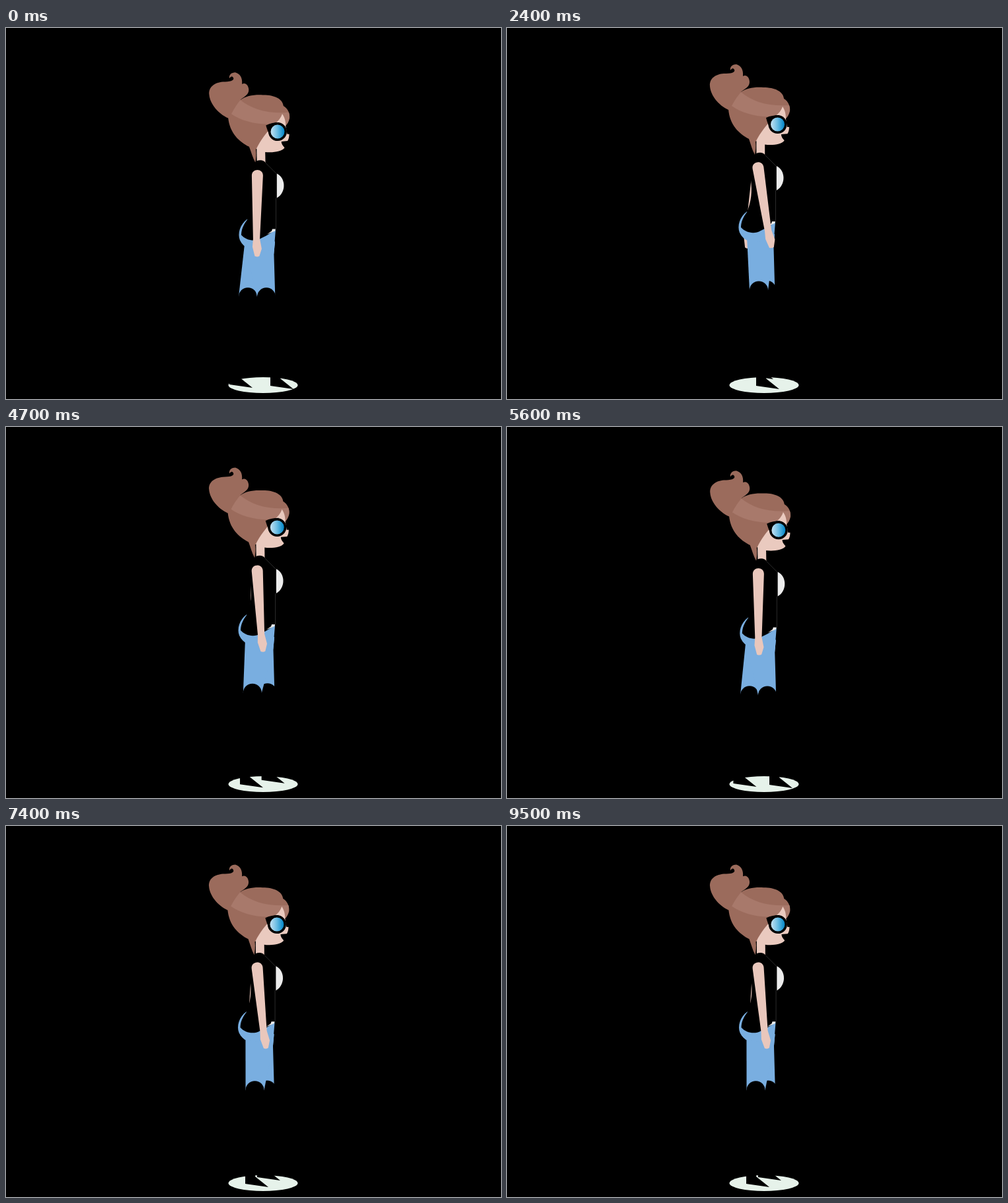
Recreate the animation shown at these times as an HTML page with a canvas. Size 749 by 562 pixels, loop 9600 ms.

```html
<!DOCTYPE html>
<html lang="en">
<head>
<meta charset="utf-8">
<title>Walk cycle</title>
<style>
html, body { margin: 0; width: 100%; height: 100%; overflow: hidden; background: #000; }
canvas { display: block; }
</style>
</head>
<body>
<canvas id="stage" width="749" height="562"></canvas>
<script>
const ctx = document.getElementById('stage').getContext('2d');
const LOOP = 9600, TICK = 100, STEP_FRAMES = 21;

const color = {
  hair: '#9b6b5c', band: '#a8796b', skin: '#eacabf', arm: '#e9c7bc',
  jeans: '#79aee0', shirt: '#ececec', floor: '#e6f2ea', black: '#000', seam: '#484848'
};

// Key poses over one step; the near foot is planted, the far foot swings.
const keyTimes = [0, .048, .143, .286, .476, .524, .667, .81, 1];
const keys = {
  drop:     [11.5, 10.6, 8.7, 3.7, 0, -.8, 3.2, 7.6, 11.5],
  swing:    [0, .015, .045, .125, .172, .16, .113, .056, 0],
  nearKnee: [394, 394, 391, 386.5, 381, 380, 376.5, 371, 366],
  farKnee:  [366, 367, 376, 386, 393, 393, 395, 396, 394],
  nearToeX: [435, 432, 427.5, 421, 412, 409, 397, 385, 373],
  nearToeY: [547, 547, 547, 547, 547, 547, 547, 546, 545],
  farToeX:  [373, 377.5, 383, 392, 403, 405, 415, 425, 435],
  farToeY:  [545, 545, 541, 536, 532, 531, 537, 541, 547]
};

function poseAt(u) {
  let i = 0;
  while (i < keyTimes.length - 2 && u >= keyTimes[i + 1]) i++;
  const f = (u - keyTimes[i]) / (keyTimes[i + 1] - keyTimes[i]);
  const pose = {};
  for (const name in keys) pose[name] = keys[name][i] + (keys[name][i + 1] - keys[name][i]) * f;
  return pose;
}

const shape = {
  bun: new Path2D('M307 88C306 76 316 70 328 69C338 69 346 68 344 63C342 60 340 61 338 64C337 58 342 55 347 55C354 57 358 63 357 73C362 70 367 75 367 82C367 90 358 93 354 97L345 126L335 124C320 117 308 102 307 88Z'),
  head: new Path2D('M354 97C362 91 375 89 388 90C405 90 418 96 419 107C426 111 429 120 428 126C427 131 424 135 422 137L412 150L380 170L376 172C377 180 376 186 375 192C371 185 369 176 366 168C351 160 337 147 335 123L342 110Z'),
  band: new Path2D('M354 97C372 112 395 119 427 117C429 123 427 132 422 137L417 119C414 126 410 131 405 134C380 136 355 129 340 118C344 110 349 103 354 97Z'),
  face: new Path2D('M417 119C421 125 422 131 422 138L424 150L427 150C427 154 426 158 424 161L420 170C416 177 400 178 390 176.5L377 171C383 159 393 146 405 134C411 130 415 125 417 119Z'),
  neck: new Path2D('M377.4 169H390.2V195H377.4Z'),
  mouth: new Path2D('M415 161C415 166 418 168 421 172L430 168L427 160Z'),
  temple: new Path2D('M392 136C398 133 405 132 412 132L402 156C396 151 394 143 392 136Z'),
  torso: new Path2D('M377 190C382 188 388 188 391 193L408 209V245L406 294C397 300 391 304 384 307C374 313 361 310 354 302C354 294 357 287 363 279C370 262 371 248 369 230C368 212 370 198 377 190Z'),
  hips: new Path2D('M363 278C352 286 348 300 352 310C355 316 359 320 364 322L403.4 326L406 294L380 285Z'),
  chest: new Path2D('M407.8 209C422 216 422 238 407.8 246Z'),
  hem: new Path2D('M393 301L400 296L401 293H406L405 296Z'),
  seam: new Path2D('M391 193L407 209M406.5 246V293'),
  arm: new Path2D('M-8.5 0C-8.5 -11.5 8.5 -11.5 8.5 0L3.7 96L6.5 111L3 122Q0 124 -4 122L-7.5 108L-6.5 96Z')
};

function fill(path, paint) {
  ctx.fillStyle = paint;
  ctx.fill(path);
}

function disc(x, y, rx, paint, ry = rx) {
  ctx.fillStyle = paint;
  ctx.beginPath();
  ctx.ellipse(x, y, rx, ry, 0, 0, Math.PI * 2);
  ctx.fill();
}

function polygon(paint, ...points) {
  ctx.fillStyle = paint;
  ctx.beginPath();
  points.forEach(([x, y]) => ctx.lineTo(x, y));
  ctx.fill();
}

function foot(x, y) {
  polygon(color.black, [x - 35, 520], [x - 35, y - 5], [x, y], [x - 20, y - 16], [x - 20, 520]);
}

function leg(knee, kneeY, dx, dy) {
  const edge = 405.3 + dx;
  polygon(color.jeans, [363 - dx, 316 + dy], [knee - 14, kneeY],
    [Math.min(knee + 14, edge), kneeY], [403.4 + dx, 330 + dy], [405 + dx, 312 + dy]);
  disc(knee, kneeY, 14, color.black);
}

function arm(x, y, angle) {
  ctx.save();
  ctx.translate(x, y);
  ctx.rotate(-angle);
  fill(shape.arm, color.arm);
  ctx.restore();
}

function head(tilt) {
  ctx.save();
  ctx.translate(385, 175);
  ctx.rotate(tilt);
  ctx.translate(-385, -175);
  fill(shape.neck, color.skin);
  fill(shape.bun, color.hair);
  fill(shape.head, color.hair);
  fill(shape.band, color.band);
  fill(shape.face, color.skin);
  fill(shape.mouth, color.black);
  fill(shape.temple, color.black);
  disc(409.5, 146, 14, color.black);
  const lens = ctx.createLinearGradient(399, 0, 420, 0);
  lens.addColorStop(0, '#c6e2f2');
  lens.addColorStop(.5, '#68bbe2');
  lens.addColorStop(1, '#0084c6');
  disc(409.5, 146, 10.5, lens);
  ctx.restore();
}

function draw(u) {
  const p = poseAt(u);
  const lean = p.drop / 11.5, dx = 2 * lean;
  const shoulderX = 380 + .4 * lean, shoulderY = 212 + p.drop;

  ctx.fillStyle = color.black;
  ctx.fillRect(0, 0, 749, 562);
  disc(389, 541, 52.5, color.floor, 12);
  foot(p.farToeX, p.farToeY);
  foot(p.nearToeX, p.nearToeY);

  arm(shoulderX, shoulderY, -p.swing * .76);
  leg(p.farKnee, 396.5 + .93 * p.drop, dx, p.drop);
  leg(p.nearKnee, 397.5 + .85 * p.drop, dx, p.drop);

  ctx.save();
  ctx.translate(dx, p.drop);
  fill(shape.hips, color.jeans);
  head(-.018 * lean);
  fill(shape.torso, color.black);
  fill(shape.chest, color.shirt);
  fill(shape.hem, color.shirt);
  ctx.strokeStyle = color.seam;
  ctx.lineWidth = .6;
  ctx.stroke(shape.seam);
  ctx.restore();

  arm(shoulderX, shoulderY, p.swing);
}

function frame() {
  const tick = Math.floor(performance.now() % LOOP / TICK);
  // The walk runs slightly ahead of three frames per tick.
  const count = 3 * tick + Math.floor((tick + 22.5) / 39.5);
  draw(count % STEP_FRAMES / STEP_FRAMES);
  requestAnimationFrame(frame);
}
frame();
</script>
</body>
</html>
```
